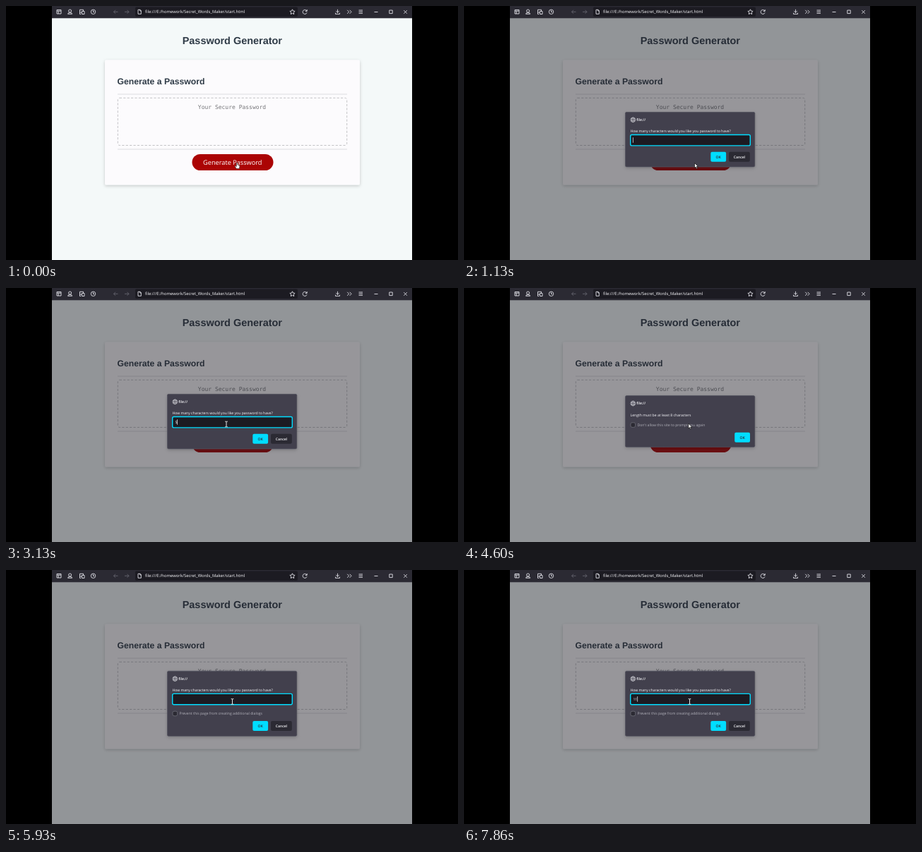
Write an HTML page that moves like this. It is 640 px wide and 360 px high and loops after 8000 ms.

```html
<!DOCTYPE html>
<html lang="en">
<head>
<meta charset="utf-8">
<title>Password Generator</title>
<style>
html, body { margin: 0; width: 100%; height: 100%; overflow: hidden; background: #000; }
svg { display: block; width: 100vw; height: 100vh; }
text { font: 5.1px "Open Sans", "Noto Sans", sans-serif; fill: #fbfbfe; text-rendering: geometricPrecision; white-space: pre; }
.mid { text-anchor: middle; }
.bold { font-weight: 600; }
.title { font: bold 14.45px "Liberation Sans", Arial, sans-serif; fill: #2f3b47; }
.head { font: bold 12.2px "Liberation Sans", Arial, sans-serif; fill: #2f3b47; }
.hint { font: 8px "DejaVu Sans Mono", monospace; fill: #76767a; }
.label { font-size: 9.2px; fill: #fff; }
.url { font-size: 5.9px; }
.soft { fill: #b3b2bb; }
.dark { fill: #2b2a33; }
.icon { fill: none; stroke: #e4e4ea; stroke-width: .9; }
.faint { stroke: #66656f; }
</style>
</head>
<body>
<svg viewBox="0 0 640 360">
  <defs>
    <filter id="shadow" x="-5%" y="-5%" width="110%" height="115%">
      <feDropShadow dx="0" dy="1.5" stdDeviation="2" flood-color="#000" flood-opacity=".2"/>
    </filter>
    <path id="hand" d="M-.9 .3V-3.3Q-.9 -4.2 -.1 -4.2T.7 -3.3V-.9L3 -.3Q3.8 0 3.7 1L3.2 4.4H-.9L-3 1.5Q-3.2 .6 -2.3 .6L-.9 1.6Z"
      fill="#fff" stroke="#222" stroke-width=".6"/>
    <path id="arrow" d="M0 0V7L1.6 5.6L2.7 8L3.9 7.5L2.8 5.1H5Z" fill="#fff" stroke="#111" stroke-width=".7"/>
    <path id="beam" d="M-1.8 -3.8H-.4L0 -3.4L.4 -3.8H1.8M0 -3.4V3.4M-1.8 3.8H-.4L0 3.4L.4 3.8H1.8"
      fill="none" stroke="#fff" stroke-width=".9"/>
  </defs>

  <rect x="65" width="510" height="360" fill="#f4f9f9"/>
  <text class="title mid" x="320.3" y="54">Password Generator</text>
  <rect x="140" y="76.5" width="361" height="177" rx="2" fill="#fcfbfd" filter="url(#shadow)"/>
  <text class="head" x="157.5" y="111">Generate a Password</text>
  <path d="M158 125H483M158 203H483" stroke="#dcdce0"/>
  <rect x="158.3" y="130.3" width="324.4" height="67.2" rx="2.5" fill="none" stroke="#c3c3c6" stroke-dasharray="3.2 2.2"/>
  <text class="hint mid" x="320" y="146">Your Secure Password</text>
  <rect x="263.5" y="210" width="115" height="23" rx="11.5" fill="#ab0404"/>
  <text class="label mid" x="320.8" y="225">Generate Password</text>
  <rect id="shade" x="65" y="17" width="510" height="343" fill="#1c1b22" opacity=".45"/>

  <rect x="65" width="510" height="17.3" fill="#2b2a33"/>
  <rect x="183" y="1.5" width="230" height="13.5" rx="2" fill="#1c1b22"/>
  <g class="icon">
    <path d="M72 5.5H78V11H72ZM72 7.2H78M74.2 7.2V11"/>
    <path d="M88.6 7A2 2 0 1 1 92.6 7Q92.6 9 90.6 9T88.6 7ZM87.6 11.3Q87.6 9.4 90.6 9.4T93.6 11.3Z"/>
    <path d="M104.5 9V5.3H109.5V7M106 11.5H104.5V9H107M107.5 7.5H111V11.5H107.5Z"/>
    <circle cx="123.5" cy="8.3" r="3.2"/><path d="M123.5 6.2V8.5H125.2"/>
    <path class="faint" d="M158.5 8.3H152.5M155 5.8L152.5 8.3L155 10.8M168 8.3H174M171.5 5.8L174 8.3L171.5 10.8"/>
    <path d="M187 5.3H190L191.3 6.7V11.3H187ZM189.8 5.3V7H191.3"/>
    <path d="M405.5 4.8L406.6 7.1L409.1 7.4L407.3 9.1L407.7 11.6L405.5 10.4L403.3 11.6L403.7 9.1L401.9 7.4L404.4 7.1Z"/>
    <path d="M425.8 7A3 3 0 1 0 426 9.4M426.2 5V7.4H423.8"/>
    <path d="M469.5 4.8V9.2M467.3 7.2L469.5 9.3L471.7 7.2M466.5 9.7V11.4H472.5V9.7"/>
    <path d="M483.2 5.8L485.7 8.3L483.2 10.8M486.6 5.8L489.1 8.3L486.6 10.8"/>
    <path d="M499.5 6H505M499.5 8.2H505M499.5 10.4H505"/>
    <path d="M521.5 8.5H526.5M542.8 6H547.2V10.6H542.8ZM563.3 6.2L567.8 10.7M567.8 6.2L563.3 10.7"/>
  </g>
  <text class="url" x="197" y="10.4">file:///E:/homework/Secret_Words_Maker/start.html</text>

  <g id="dialog"></g>
  <use id="pointer"/>
</svg>
<script>
const $ = id => document.getElementById(id);
const LOOP = 8000, BLINK = 530;
const PROMPT = 1130, ALERT = 3930, AGAIN = 5400;

const text = (x, y, s, cls = '') => `<text x="${x}" y="${y}" class="${cls}">${s}</text>`;
const rect = (x, y, w, h, fill, more = '') =>
  `<rect x="${x}" y="${y}" width="${w}" height="${h}" rx="2" fill="${fill}" ${more}/>`;

const frame = (y, h, message) =>
  rect(228.3, y, 183.6, h, '#42414d', 'stroke="#575662" stroke-width=".6" filter="url(#shadow)"') +
  `<g class="icon" style="stroke-width:.6" transform="translate(239.3 ${y + 11})"><circle r="3.3"/>
   <ellipse rx="1.5" ry="3.3"/><path d="M-3.1 -1.2H3.1M-3.1 1.2H3.1"/></g>` +
  text(244.3, y + 12.8, 'file://', 'bold') + text(235.5, y + 28.9, message);

const check = (y, label) =>
  rect(236, y, 6.6, 6.6, '#2b2a33', 'stroke="#75747f" stroke-width=".7"') + text(245.5, y + 5.2, label, 'soft');

const button = (x, y, w, label, main) =>
  rect(x, y, w, 14, main ? '#00ddff' : '#2b2a33') +
  text(x + w / 2, y + 8.8, label, 'mid bold' + (main ? ' dark' : ''));

function prompt(y, h, value, caretOn, extra = '') {
  const caret = 239.4 + value.length * 3.1;
  return frame(y, h, 'How many characters would you like you password to have?') +
    rect(235.7, y + 32.2, 169.6, 15.4, '#1c1b22', 'stroke="#00ddff" stroke-width="1.4"') +
    text(239.4, y + 41.9, value) +
    (caretOn ? `<path d="M${caret} ${y + 36}V${y + 43.5}" stroke="#fbfbfe" stroke-width=".7"/>` : '') +
    extra + button(349.3, y + h - 21.4, 21.8, 'OK', true) + button(375, y + h - 21.4, 29.8, 'Cancel');
}

// The caret restarts its blink with every key.
const blink = (t, since) => Math.floor((t - since) / BLINK) % 2 === 0;

function dialog(t) {
  if (t < PROMPT) return '';
  if (t < ALERT) {
    const typed = t >= 3130;
    return prompt(150.3, 77.8, typed ? '5' : '', blink(t, typed ? 3130 : PROMPT));
  }
  if (t < AGAIN) {
    return frame(152.6, 73, 'Length must be at least 8 characters') +
      check(190.8, "Don't allow this site to prompt you again") + button(383.2, 204.7, 21.8, 'OK', true);
  }
  const keys = [7600, 7860].filter(k => t >= k);
  return prompt(143.2, 92.3, '1'.repeat(keys.length), blink(t, keys.at(-1) ?? AGAIN),
    check(200.2, 'Prevent this page from creating additional dialogs'));
}

// Moves: start, end, x, y
const moves = [[1600, 2060, 312, 193], [3700, 4060, 317.8, 192], [5420, 5800, 320.5, 186.5], [7260, 7460, 319.5, 186.5]];

function pointer(t) {
  let x = 326.5, y = 222.5;
  for (const [a, b, toX, toY] of moves) {
    const p = Math.min(1, Math.max(0, (t - a) / (b - a))), e = p * p * (3 - 2 * p);
    x += (toX - x) * e;
    y += (toY - y) * e;
  }
  if (t < PROMPT) return ['hand', 327.2, 226];
  const inField = t < ALERT ? y < 198 : t >= AGAIN && y < 191;
  return [inField ? 'beam' : 'arrow', x, y];
}

let last;
function draw(now) {
  const t = now % LOOP, html = dialog(t), [shape, x, y] = pointer(t);
  if (html !== last) $('dialog').innerHTML = last = html;
  $('shade').style.display = t < PROMPT ? 'none' : '';
  $('pointer').setAttribute('href', '#' + shape);
  $('pointer').setAttribute('transform', `translate(${x} ${y})`);
}

const start = performance.now();
function tick() {
  draw(performance.now() - start);
  requestAnimationFrame(tick);
}
tick();
</script>
</body>
</html>
```
